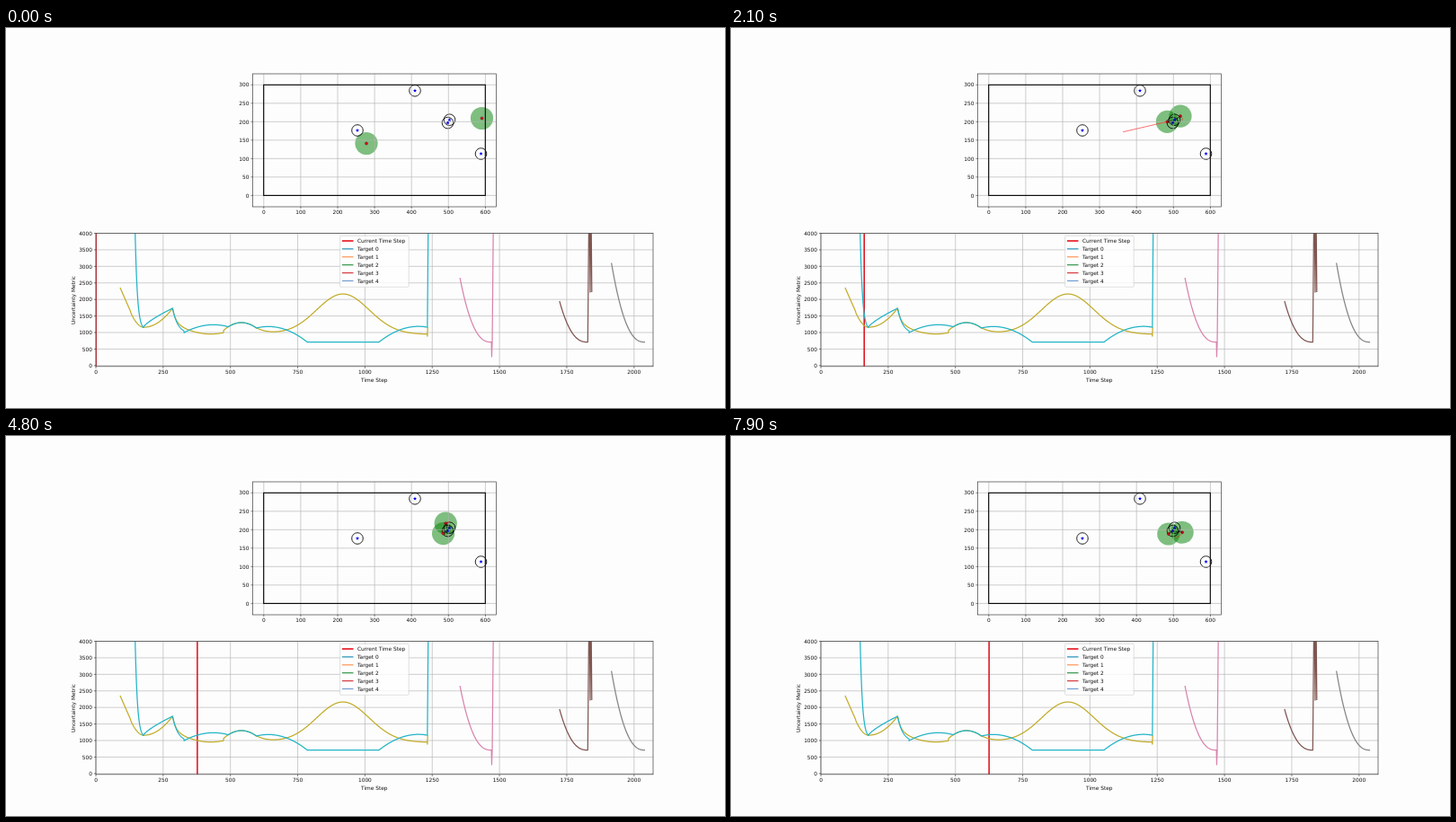
Recreate the animation shown at these times as an HTML page. Size 800x423 px, loop 8 s.

```html
<!DOCTYPE html>
<html lang="en">
<head>
<meta charset="utf-8">
<title>Target tracking</title>
<style>
html, body { margin: 0; width: 100%; height: 100%; overflow: hidden; background: #fdfdfe; }
svg { display: block; width: 100%; height: 100%; }
text { font: 5.85px "DejaVu Sans", sans-serif; fill: #111; }
.grid { stroke: #b4b4b4; stroke-width: .65; }
.tick { stroke: #222; stroke-width: .6; }
.spine { fill: none; stroke: #333; stroke-width: .65; }
.curve { fill: none; stroke-width: 1.25; stroke-linejoin: round; }
</style>
</head>
<body>
<svg id="stage" viewBox="0 0 800 423"></svg>
<script>
const LOOP = 8000, FRAME = 100, STEPS_PER_FRAME = 8, TRAIL_STEPS = 100;
const stage = document.getElementById('stage');

function add(name, attrs = {}, parent = stage) {
  const node = document.createElementNS('http://www.w3.org/2000/svg', name);
  set(node, attrs);
  parent.appendChild(node);
  return node;
}
function set(node, attrs) {
  for (const key in attrs) node.setAttribute(key, attrs[key]);
}
const line = (x1, y1, x2, y2, attrs, parent) => add('line', { x1, y1, x2, y2, ...attrs }, parent);
function label(text, x, y, anchor = 'middle', attrs = {}) {
  add('text', { x, y, 'text-anchor': anchor, ...attrs }).textContent = text;
}

function grid({ left, top, right, bottom, x0, dx, xStep, xCount, y0, dy, yStep, yCount }) {
  for (let i = 0; i < xCount; i++) {
    const x = x0 + i * dx;
    line(x, top, x, bottom, { class: 'grid' });
    line(x, bottom, x, bottom + 2, { class: 'tick' });
    label(i * xStep, x, bottom + 8.3);
  }
  for (let i = 0; i < yCount; i++) {
    const y = y0 - i * dy;
    line(left, y, right, y, { class: 'grid' });
    line(left - 2, y, left, y, { class: 'tick' });
    label(i * yStep, left - 4, y + 2.2, 'end');
  }
}
function spine({ left, top, right, bottom }) {
  add('rect', { x: left, y: top, width: right - left, height: bottom - top, class: 'spine' });
}

// Arena: each target follows a route at constant speed, then circles the sensor pair.
const hub = { x: 494, y: 104.3, r: 8.6 };
const targets = [
  { route: [[401, 128.5], [400, 124], [400, 143], [383, 143], [383, 128]],
    arrival: 89, angle: s => 180 + 160 * ((s - 89) / 536) ** 2.7 },
  { route: [[529.5, 100.5], [522, 107.5], [522, 91], [505, 91]],
    arrival: 33, angle: s => (s - 33) * .36 }
];

function orbit(target, step) {
  const a = target.angle(step) * Math.PI / 180;
  return [hub.x + hub.r * Math.cos(a), hub.y - hub.r * Math.sin(a)];
}
const distance = (a, b) => Math.hypot(b[0] - a[0], b[1] - a[1]);

function along(points, fraction) {
  const lengths = points.slice(1).map((p, i) => distance(points[i], p));
  let rest = fraction * lengths.reduce((a, b) => a + b), i = 0;
  while (i < lengths.length - 1 && rest > lengths[i]) rest -= lengths[i++];
  const f = rest / lengths[i];
  return points[i].map((v, k) => v + (points[i + 1][k] - v) * f);
}
function positionAt(target, step) {
  const { route, arrival } = target;
  if (step >= arrival) return orbit(target, step);
  return along([...route, orbit(target, arrival)], step / arrival);
}

const arena = { left: 274.5, top: 51, right: 545.5, bottom: 199, x0: 286.8, dx: 41.1, xStep: 100, xCount: 7,
                y0: 186.4, dy: 20.52, yStep: 50, yCount: 7 };
const sensors = [[455, 69.8], [391, 114], [528.5, 140], [491.5, 105.6], [493.5, 102.2]];

for (const target of targets) target.disc = add('circle', { r: 12.6, fill: '#008000', 'fill-opacity': .5 });
for (const [cx, cy] of sensors) add('circle', { cx, cy, r: 6.3, fill: 'none', stroke: '#000', 'stroke-width': .85 });
grid(arena);
spine(arena);
add('rect', { x: 286.7, y: 63.3, width: 246.6, height: 123.1, fill: 'none', stroke: '#000', 'stroke-width': 1.1 });

function star(x, y) {
  const points = Array.from({ length: 10 }, (_, i) => {
    const r = i % 2 ? .95 : 2.2, a = i * Math.PI / 5;
    return [x + r * Math.sin(a), y - r * Math.cos(a)];
  });
  add('polygon', { points: points.join(' '), fill: '#0000f0' });
}
for (const target of targets) {
  target.trail = add('path', { fill: 'none', stroke: '#ff3030', 'stroke-opacity': .8, 'stroke-width': .9 });
  target.dot = add('circle', { r: 1.5, fill: '#e01020', stroke: '#701010', 'stroke-width': .6 });
}
for (const sensor of sensors) star(...sensor);
const links = targets.flatMap(target => sensors.slice(3).map(sensor => ({
  target, sensor,
  node: line(...sensor, ...sensor, { stroke: '#000', 'stroke-width': .65, 'stroke-dasharray': '2 1.2' })
})));

// Metric chart
const TOP = 4200, FLOOR = 710;
const plot = { left: 100, top: 228.5, right: 720, bottom: 376.8, x0: 100, dx: 74.85, xStep: 250, xCount: 9,
               y0: 375.8, dy: 18.41, yStep: 500, yCount: 9 };
const toX = step => plot.x0 + step * plot.dx / plot.xStep;
const toY = value => plot.y0 - value * plot.dy / plot.yStep;

grid(plot);
label('Time Step', 409.8, 394.2);
label('Uncertainty Metric', 0, 0, 'middle', { transform: 'translate(76.5 303) rotate(-90)' });
const clip = add('clipPath', { id: 'plot' });
add('rect', { x: plot.left, y: plot.top, width: plot.right - plot.left, height: plot.bottom - plot.top }, clip);
const chart = add('g', { 'clip-path': 'url(#plot)' });
const now = line(0, plot.top, 0, plot.bottom, { stroke: '#dd0a14', 'stroke-width': 1.5 }, chart);

const parabola = (s, centre, peak, bend) => peak + bend * (s - centre) ** 2;
const decay = (s, from, scale) => Math.exp(-(s - from) / scale);
const hump = s => parabola(s, 541, 1300, -.053);

function firstMetric(s) {
  if (s < 130) return 2357 - 18.5 * (s - 90);
  if (s < 285) return parabola(s, 178, 1160, s < 178 ? .19 : .05);
  if (s < 475) return parabola(s, 427, 955, .018) + 415 * decay(s, 285, 12);
  if (s < 598) return hump(s);
  return 945 + 1220 * Math.exp(-(((s - 918) / 138) ** 2)) + 190 * decay(s, 598, 40);
}
function secondMetric(s) {
  if (s < 176) return 1070 + 2930 * decay(s, 146, 8.5);
  if (s < 285) return 1150 + 583 * ((s - 176) / 109) ** .75;
  if (s < 328) return 960 + 773 * decay(s, 285, 20);
  return Math.max(FLOOR, hump(s), parabola(s, 437, 1235, -.02), parabola(s, 641, 1180, -.0225),
                  parabola(s, 1199, 1185, -.022));
}
const settle = (from, to, value) => s => FLOOR + (value - FLOOR) * (1 - (s - from) / (to - from)) ** 2.5;

function curve(color, metric, from, to, tail = []) {
  const points = [];
  for (let s = from; s <= to; s++) points.push([s, metric(s)]);
  const d = 'M' + [...points, ...tail].map(([s, v]) => [toX(s), toY(v)]).join('L');
  add('path', { d, class: 'curve', stroke: color }, chart);
}
const spikes = Array.from({ length: 7 }, (_, i) => [1831 + 2 * i, i % 3 ? TOP : 2220]).slice(1);

curve('#c2ad2a', firstMetric, 90, 1231, [[1232, 890], [1233, 1160]]);
curve('#22b4c6', secondMetric, 145, 1232, [[1235, TOP]]);
curve('#d983ad', settle(1353, 1470, 2656), 1353, 1470, [[1471, 270], [1473, FLOOR], [1477, TOP]]);
curve('#7f5650', settle(1723, 1828, 1950), 1723, 1828, [[1832, TOP], ...spikes]);
curve('#858585', settle(1916, 2041, 3104), 1916, 2041);
spine(plot);

// Legend
add('rect', { x: 371.7, y: 231.3, width: 76.5, height: 57, rx: 1.2, fill: '#fff', 'fill-opacity': .8,
              stroke: '#ccc', 'stroke-width': .6 });
['#e8101a', '#1f92b8', '#ff9250', '#2f9448', '#d63a3e', '#6f9bd0'].forEach((color, i) => {
  const y = 237 + i * 8.9;
  line(374, y, 386.5, y, { stroke: color, 'stroke-width': i ? 1.2 : 1.6 });
  label(i ? `Target ${i - 1}` : 'Current Time Step', 391, y + 2.1, 'start');
});

function draw(time) {
  const frame = Math.floor(time % LOOP / FRAME);
  const step = Math.max(0, STEPS_PER_FRAME * (frame - 1) + 1);
  set(now, { x1: toX(step), x2: toX(step) });

  for (const target of targets) {
    const trail = [];
    for (let s = Math.max(0, step - TRAIL_STEPS); s <= step; s++) trail.push(positionAt(target, s));
    target.at = trail[trail.length - 1];
    const [cx, cy] = target.at;
    set(target.disc, { cx, cy });
    set(target.dot, { cx, cy });
    set(target.trail, { d: 'M' + trail.join('L') });
  }
  for (const { target, sensor, node } of links) {
    const [x2, y2] = target.at;
    set(node, { x2, y2, visibility: distance(target.at, sensor) < 14 ? 'visible' : 'hidden' });
  }
}

const start = performance.now();
function tick() {
  draw(performance.now() - start);
  requestAnimationFrame(tick);
}
tick();
</script>
</body>
</html>
```
